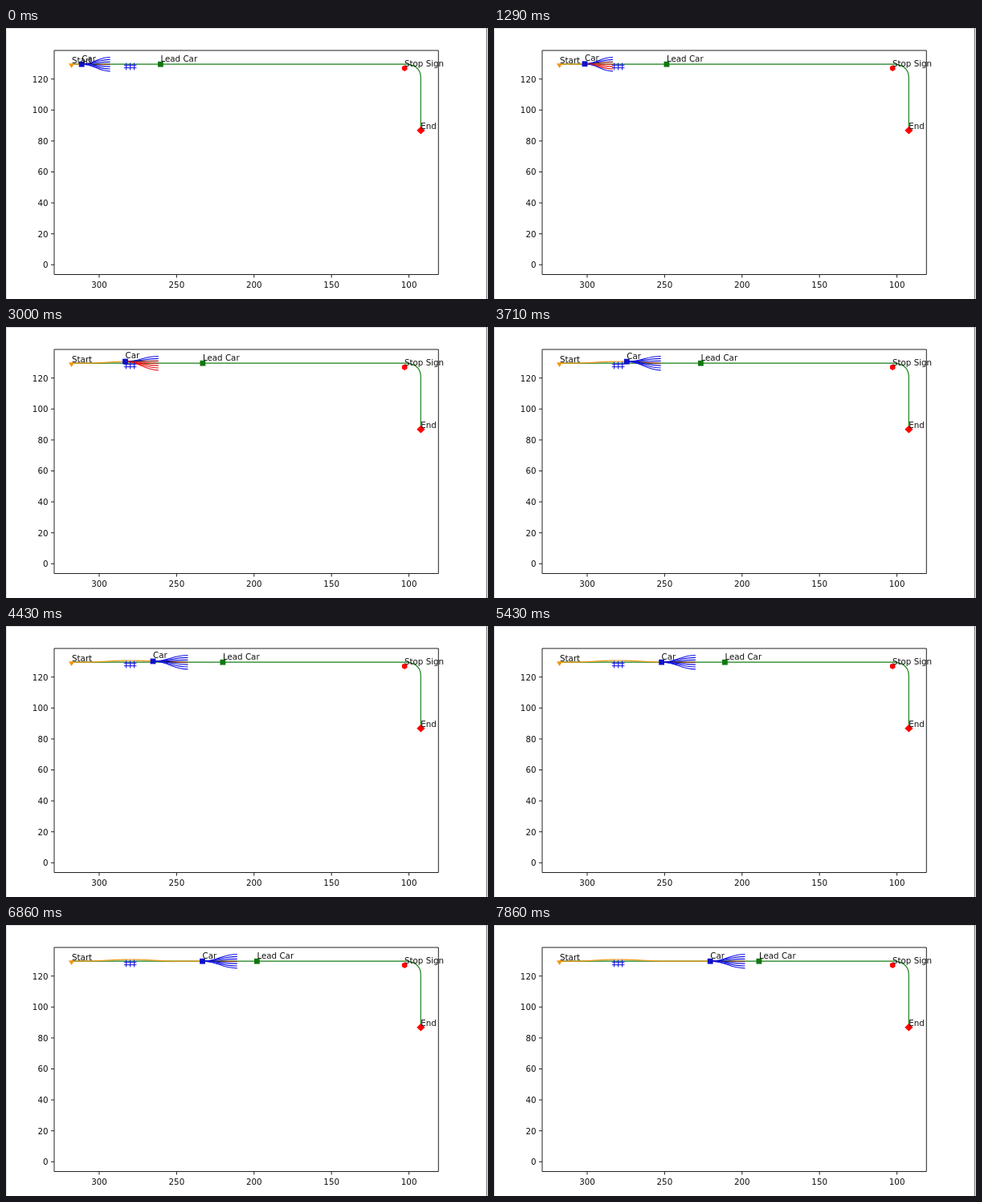
An HTML page with a canvas that plays this animation: 600x338 px, repeating every 8 s.

```html
<!DOCTYPE html>
<html lang="en">
<head>
<meta charset="utf-8">
<title>Path planner plot</title>
<style>
  html, body { margin: 0; width: 100%; height: 100%; overflow: hidden; background: #fff; }
  canvas { display: block; }
</style>
</head>
<body>
<canvas id="plot" width="600" height="338"></canvas>
<script>
const ctx = document.getElementById("plot").getContext("2d");
const LOOP = 8000, STEPS = 56, LANE_Y = 45.2, LANE_GAP = 2.89;
const GREEN = "#188018", BLUE = "#1414e6", RED = "#e81414", ORANGE = "#f0960f";

// Step number, car x and planning distance
const KNOTS = [
  [0, 94.2, 35.5], [9, 113, 35], [21, 148.5, 41.3], [31, 183, 43.5],
  [38, 208.6, 42.3], [48, 244.5, 43.3], [55, 269.2, 43.3]
];

function slope(i) {
  const a = KNOTS[Math.max(i - 1, 0)], b = KNOTS[Math.min(i + 1, KNOTS.length - 1)];
  return (b[1] - a[1]) / (b[0] - a[0]);
}

function carState(step) {
  let i = 0;
  while (i < KNOTS.length - 2 && step >= KNOTS[i + 1][0]) i++;
  const [s0, x0, r0] = KNOTS[i], [s1, x1, r1] = KNOTS[i + 1];
  const h = s1 - s0, u = (step - s0) / h, ease = u * u * (3 - 2 * u);
  const x = x0 + (x1 - x0) * ease
    + h * u * (1 - u) * ((1 - u) * slope(i) - u * slope(i + 1));
  return { x, y: carY(x), reach: r0 + (r1 - r0) * u };
}

// The car swerves around the parked obstacle
function carY(x) {
  const d = (x - 155) / 60;
  return Math.abs(d) < 1 ? LANE_Y - 2.2 * Math.cos(d * Math.PI / 2) ** 2 : LANE_Y;
}

function stroke(color, width, draw) {
  ctx.strokeStyle = color;
  ctx.lineWidth = width;
  ctx.beginPath();
  draw();
  ctx.stroke();
}

function line(x0, y0, x1, y1) {
  ctx.moveTo(x0, y0);
  ctx.lineTo(x1, y1);
}

function polygon(color, points) {
  ctx.fillStyle = color;
  ctx.beginPath();
  points.forEach(([x, y]) => ctx.lineTo(x, y));
  ctx.fill();
}

function square(color, x, y) {
  ctx.fillStyle = color;
  ctx.fillRect(x - 3.4, y - 3.4, 6.8, 6.8);
}

function text(label, x, y, align = "left") {
  ctx.font = "10.3px 'DejaVu Sans', sans-serif";
  ctx.textAlign = align;
  ctx.fillStyle = "#111";
  ctx.fillText(label, x, y);
}

function drawAxes() {
  ctx.fillStyle = "#fff";
  ctx.fillRect(0, 0, 600, 338);
  stroke("#dcdcdc", 1, () => { line(0, .5, 598, .5); line(.5, 0, .5, 338); });
  stroke("#777", 1.3, () => line(598.5, 0, 598.5, 338));
  stroke("#222", 1, () => {
    ctx.rect(60, 28, 478.3, 279.5);
    for (let i = 0; i < 5; i++) line(116 + i * 96.4, 307.5, 116 + i * 96.4, 311.5);
    for (let i = 0; i < 7; i++) line(56, 295.3 - i * 38.6, 60, 295.3 - i * 38.6);
  });
  for (let i = 0; i < 5; i++) text(300 - i * 50, 116 + i * 96.4, 323.5, "center");
  for (let i = 0; i < 7; i++) text(i * 20, 52.5, 299.2 - i * 38.6, "right");
}

function drawRoute() {
  stroke(GREEN, 1.2, () => {
    ctx.moveTo(82, LANE_Y);
    ctx.lineTo(497, LANE_Y);
    ctx.bezierCurveTo(507, LANE_Y, 516.3, 50, 516.3, 62);
    ctx.lineTo(516.3, 127);
  });
}

function drawTrace(car) {
  stroke(ORANGE, 1.2, () => {
    ctx.moveTo(82, LANE_Y);
    for (let x = 84; x < car.x; x += 2) ctx.lineTo(x, carY(x));
    ctx.lineTo(car.x, car.y);
  });
}

function drawFan(car, step) {
  const blocked = step >= 5 && step < 26;
  const chosen = blocked ? -1 : 0;
  const lastBlocked = step < 14 ? 2 : 3;
  const endX = car.x + car.reach, bend = car.reach * .45;
  for (let lane = -3; lane <= 3; lane++) {
    const y = LANE_Y + lane * LANE_GAP;
    let color = blocked && lane >= 0 && lane <= lastBlocked ? RED : BLUE;
    if (lane === chosen) {
      color = ctx.createLinearGradient(car.x, 0, endX, 0);
      color.addColorStop(0, "#101050");
      color.addColorStop(.45, "#201018");
      color.addColorStop(.6, "#8a1010");
      color.addColorStop(1, "#901818");
    }
    stroke(color, 1.15, () => {
      ctx.moveTo(car.x, car.y);
      ctx.bezierCurveTo(car.x + bend, car.y, endX - bend, y, endX, y);
    });
  }
}

function drawObstacle() {
  stroke(BLUE, 1, () => {
    for (const x of [149.6, 154.6, 159.6])
      for (const y of [46.3, 49.7]) {
        line(x - 2.8, y, x + 2.8, y);
        line(x, y - 2.8, x, y + 2.8);
      }
  });
}

function drawMarkers(car, leadX) {
  polygon(ORANGE, [[78, 44.3], [85.2, 44.3], [81.6, 50]]);
  polygon("#f00", Array.from({ length: 6 }, (_, i) =>
    [496.2 + 3.8 * Math.sin(i * Math.PI / 3), 50.2 + 3.8 * Math.cos(i * Math.PI / 3)]));
  polygon("#f00", [[511.3, 127.7], [516.4, 122.8], [521.5, 127.7], [516.4, 132.5]]);
  square("#0f780f", leadX, LANE_Y);
  square("#1010c8", car.x, car.y);
}

function drawLabels(car, leadX) {
  text("Start", 82, 44.4);
  text("Car", car.x, car.y - 3.6);
  text("Lead Car", leadX, LANE_Y - 3.6);
  text("Stop Sign", 496, 48.3);
  text("End", 516.2, 126.2);
}

function render(now) {
  const time = now % LOOP;
  const step = Math.min(STEPS - 1, Math.floor((time + 5) * STEPS / LOOP));
  const car = carState(step), leadX = 192.4 + 2.5 * step;
  drawAxes();
  drawRoute();
  drawTrace(car);
  drawFan(car, step);
  drawObstacle();
  drawMarkers(car, leadX);
  drawLabels(car, leadX);
}

const start = performance.now();
function tick() {
  render(performance.now() - start);
  requestAnimationFrame(tick);
}
tick();
</script>
</body>
</html>
```
